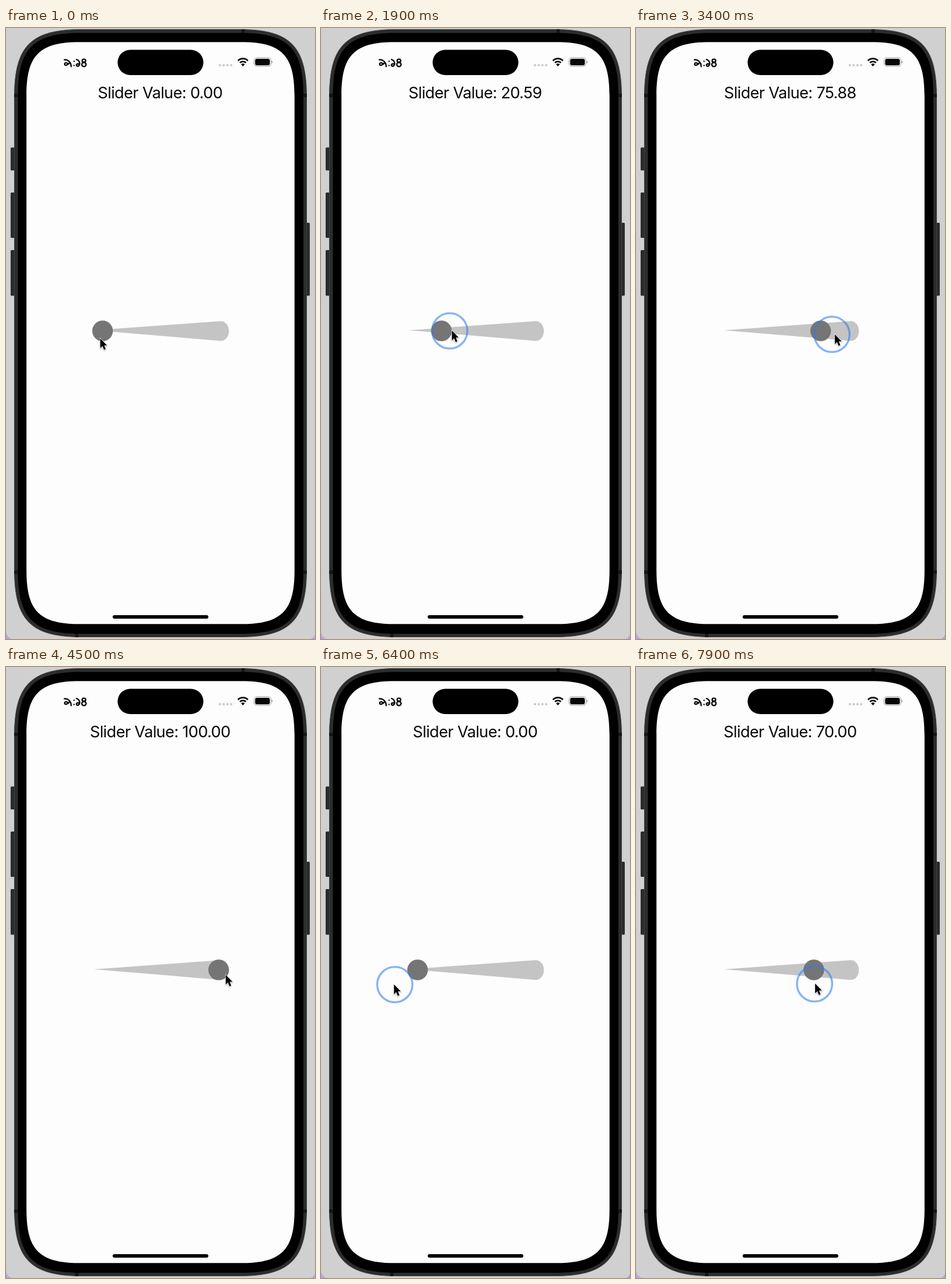
Recreate the animation shown at these times as an HTML page. Size 533 by 1051 pixels, loop 8 s.

```html
<!DOCTYPE html>
<html lang="en">
<head>
<meta charset="utf-8">
<title>Tapered slider</title>
<style>
  html, body { margin: 0; width: 100%; height: 100%; overflow: hidden; background: #d0d0d0; }
  svg { display: block; width: 100%; height: 100%; filter: blur(.35px); }
  #label {
    font: 400 27.4px Inter, "Liberation Sans", sans-serif;
    letter-spacing: -.68px;
    text-anchor: middle;
    fill: #0a0a0a;
  }
  .line { fill: none; stroke: #080808; stroke-width: 2.4; stroke-linecap: round; stroke-linejoin: round; }
  #pointer { filter: drop-shadow(0 1.5px 1.2px rgba(0, 0, 0, .35)); }
</style>
</head>
<body>
<svg viewBox="0 0 533 1051">
  <rect width="533" height="1051" fill="#d0d0d0"/>
  <path d="M0 1039Q2 1049 11 1051H0ZM533 1043Q531 1049 525 1051H533Z" fill="#b9a5e6"/>

  <!-- Side buttons -->
  <g fill="#2b2b2c">
    <rect x="8" y="205.5" width="8" height="39.5" rx="1.5"/>
    <rect x="8" y="283" width="8" height="78" rx="1.5"/>
    <rect x="8" y="382" width="8" height="78.5" rx="1.5"/>
    <rect x="516" y="335" width="8" height="125.5" rx="1.5"/>
  </g>

  <!-- Body, antenna gaps, bezel and screen -->
  <path id="body" fill="#2b2c2c" stroke="#414242"/>
  <path d="M14 116H21M512 116H519M14 936H21M512 936H519M409 2V9M122 1041V1048" stroke="#171717" stroke-width="6"/>
  <path id="bezel"/>
  <path id="screen" fill="#fdfdfd"/>
  <rect x="192.5" y="37.5" width="148" height="43.5" rx="21.75"/>
  <rect x="184" y="1010" width="165" height="6" rx="3"/>

  <!-- Status bar: clock, signal, wireless, battery -->
  <g role="img" aria-label="৯:১৪">
    <path class="line" d="M100.6 54.6C106 54 112.3 58 112.4 66.2M109.8 59.5C107 63.6 102 65.6 101.2 62.6C100.6 59.6 105.4 58.6 106.6 62.2"/>
    <path class="line" d="M117.4 57.2V57.3M117.4 64.4V64.5" stroke-width="3"/>
    <path class="line" d="M121.6 54.2C125.6 55.4 127.6 59 126.9 62.2C126 66.6 121.4 66.6 121.5 63.6C121.7 61.3 124.4 61.4 126.9 62.2"/>
    <ellipse class="line" cx="134.4" cy="56.2" rx="3" ry="2.6"/>
    <ellipse class="line" cx="134.4" cy="62.8" rx="3.7" ry="3.6"/>
  </g>
  <path d="M369 64H390" stroke="#c9c9c9" stroke-width="4.2" stroke-linecap="round" stroke-dasharray="0 6.47" fill="none"/>
  <path d="M400.1 56.2A12 12 0 0 1 417.3 56.2M403.5 59.8A7.3 7.3 0 0 1 413.9 59.8" fill="none" stroke="#080808" stroke-width="2.7"/>
  <path d="M408.7 66L405.4 62.6A4.8 4.8 0 0 1 412 62.6Z" fill="#080808"/>
  <rect x="427.9" y="51.2" width="29.2" height="14.8" rx="4.7" fill="none" stroke="#a5a5a5" stroke-width="1.2"/>
  <rect x="429.7" y="53" width="25.4" height="11.2" rx="3.2" fill="#080808"/>
  <path d="M458.2 56.2Q460 57 460 58.6T458.2 61Z" fill="#a5a5a5"/>

  <text id="label" x="265.8" y="121"></text>

  <path d="M152 520L370 504.2C379 503.8 384.5 513 384.5 521.2S379 538.8 370 538.2Z" fill="#c4c4c4"/>
  <circle id="thumb" cy="521" r="17.8" fill="#757575"/>
  <circle id="ring" r="30.4" fill="none" stroke="#307cf0" stroke-opacity=".58" stroke-width="3.4"/>
  <path id="pointer" d="M0 0V16.8L3.8 13.2 6.5 19.7 9.4 18.4 6.8 12H11.7Z" stroke="#fff" stroke-width="1.3" paint-order="stroke"/>
</svg>

<script>
const LOOP = 8000, STEP = 100, LEAD = 40;

// Resting points and turns of the finger: time, x, y
const touch = [
  [0, 161, 537], [300, 165, 519.5], [1000, 165, 519.5],
  [1900, 222, 521], [3400, 338, 527], [4050, 410, 545], [4500, 378, 530],
  [4800, 378, 530], [5400, 290, 531], [6550, 122, 547], [7900, 308, 545]
];

// Slider value: time, percent
const level = [
  [0, 0], [1200, 0], [1900, 20.59], [3400, 75.88], [3800, 100],
  [4900, 100], [5400, 61.96], [6200, 0], [7200, 0], [7900, 70]
];

const $ = id => document.getElementById(id);
const label = $('label'), thumb = $('thumb'), ring = $('ring'), pointer = $('pointer');

// Rectangle with continuous corners, inset equally on all sides of the device
function squircle(id, x, y, w, h, r) {
  const d = r * 1.35, e = r * .33, c = d - e;
  $(id).setAttribute('d', `M${x + d} ${y}h${w - 2 * d}c${c} 0 ${d} ${e} ${d} ${d}
    v${h - 2 * d}c0 ${c} ${-e} ${d} ${-d} ${d}h${2 * d - w}c${-c} 0 ${-d} ${-e} ${-d} ${-d}
    v${2 * d - h}c0 ${-c} ${e} ${-d} ${d} ${-d}z`);
}

// Smooth curve through the keys that never overshoots: flat at turns and rests
function curve(keys, t, col) {
  const last = keys.length - 1;
  const slope = i => (keys[i + 1][col] - keys[i][col]) / (keys[i + 1][0] - keys[i][0]);
  const tangent = i => {
    if (i === 0) return slope(0);
    if (i === last) return slope(last - 1);
    const a = slope(i - 1), b = slope(i);
    return a * b > 0 ? 2 * a * b / (a + b) : 0;
  };
  if (t >= keys[last][0]) return keys[last][col];
  const i = keys.findIndex(k => k[0] > t) - 1;
  const [a, b] = [keys[i], keys[i + 1]];
  const span = b[0] - a[0], p = (t - a[0]) / span, q = 1 - p;
  return q * q * (1 + 2 * p) * a[col] + p * p * (1 + 2 * q) * b[col]
    + p * q * span * (q * tangent(i) - p * tangent(i + 1));
}

function draw(now) {
  const t = Math.floor(now % LOOP / STEP) * STEP;

  // The track is 170 points long, with three pixels to a point
  const value = Math.round(curve(level, t, 1) * 5.1) / 5.1;
  label.textContent = 'Slider Value: ' + value.toFixed(2);
  thumb.setAttribute('cx', 166.6 + value * 2.002);

  const pressed = t >= 1000 && t < 4500 || t >= 4800;
  ring.setAttribute('visibility', pressed ? 'visible' : 'hidden');
  ring.setAttribute('cx', curve(touch, t, 1));
  ring.setAttribute('cy', curve(touch, t, 2));

  // The pointer runs slightly ahead of the touch ring
  const x = curve(touch, t + LEAD, 1) + 1, y = curve(touch, t + LEAD, 2) - .5;
  pointer.setAttribute('transform', `translate(${x} ${y})`);
}

squircle('body', 14.5, 2.5, 504, 1045, 86);
squircle('bezel', 20.5, 8.5, 492.5, 1033.5, 80);
squircle('screen', 35.3, 24.3, 462.4, 1001, 68);

const start = performance.now();
function tick() {
  draw(performance.now() - start);
  requestAnimationFrame(tick);
}
tick();
</script>
</body>
</html>
```
